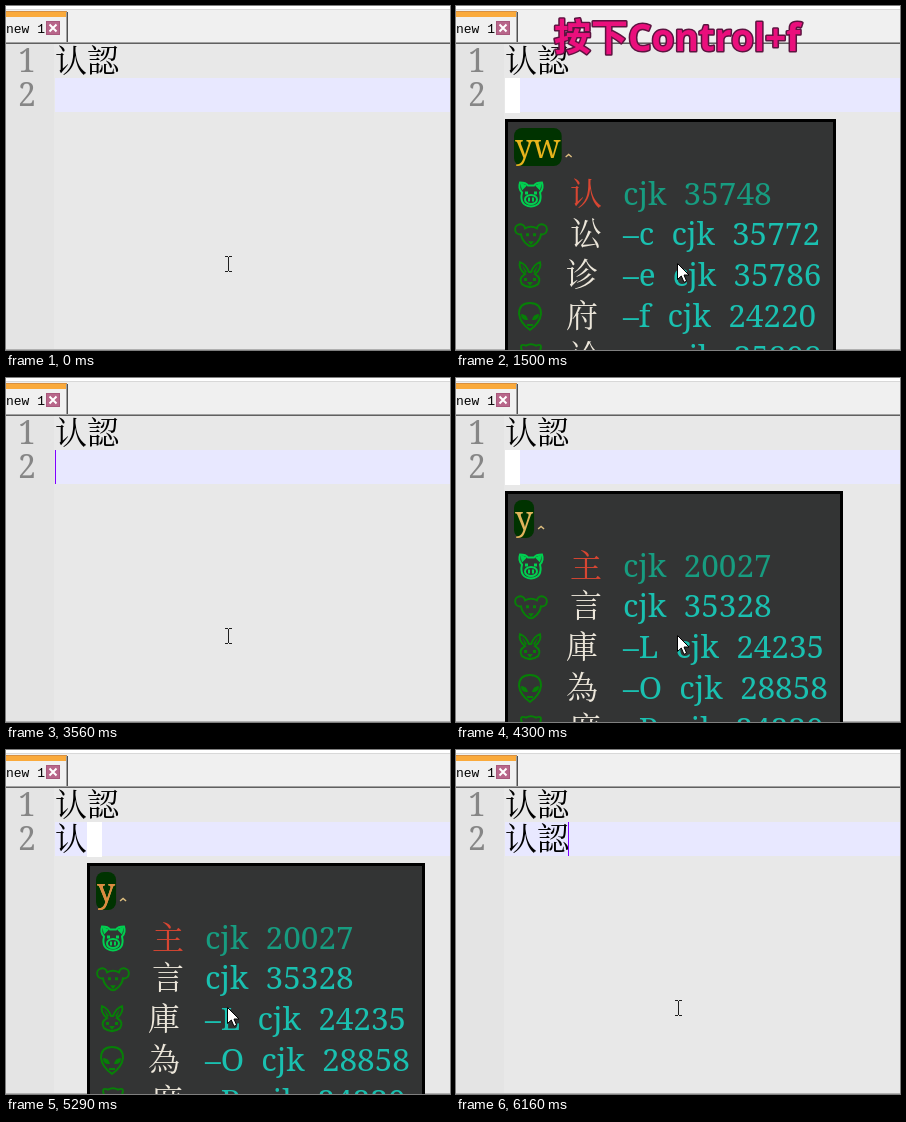
These frames come from a looping animation (444x344 px, 6.66 s). An HTML page with a canvas:

```html
<!DOCTYPE html>
<html lang="zh-CN">
<head>
<meta charset="utf-8">
<style>
html, body { margin: 0; width: 100%; height: 100%; overflow: hidden; }
canvas { display: block; width: 444px; height: 344px; }
</style>
</head>
<body>
<canvas id="stage" width="444" height="344"></canvas>
<script>
const ctx = document.getElementById('stage').getContext('2d');
const LOOP = 6660;
const LATIN = '32px "Noto Serif", serif';
const HAN = '300 32px "Noto Serif CJK SC", "Source Han Serif SC", "Noto Sans CJK SC", "Noto Sans CJK", serif';
const isHan = text => /[\u4e00-\u9fff]/.test(text);

// Candidate lists: code typed, right edge of the popup, rows of "character note"
const LISTS = {
  codes: { code: 'yw', right: 380, rows: ['认 cjk 35748', '讼 –c cjk 35772', '诊 –e cjk 35786', '府 –f cjk 24220', '诠 –g cjk 35808'] },
  pairs: { code: 'yw', right: 378, rows: ['认 認', '讼 訟', '诊 診', '府 –f cjk 24220', '诠 詮'] },
  first: { code: 'y', right: 387, rows: ['主 cjk 20027', '言 cjk 35328', '庫 –L cjk 24235', '為 –O cjk 28858', '度 –P cjk 24230'] }
};

// Each step lasts until the next one begins
const STEPS = [
  { at: 0, text: '' },
  { at: 380, text: '', composing: true },
  { at: 500, text: '', list: 'codes' },
  { at: 1000, text: '', list: 'codes', caret: true },
  { at: 1500, text: '', list: 'codes', hint: true },
  { at: 2170, text: '', list: 'pairs' },
  { at: 2540, text: '', list: 'pairs', caret: true },
  { at: 3040, text: '', list: 'pairs' },
  { at: 3560, text: '', caret: true },
  { at: 4180, text: '', composing: true },
  { at: 4300, text: '', list: 'first' },
  { at: 4420, text: '', list: 'pairs' },
  { at: 4800, text: '', caret: true },
  { at: 4930, text: '认', caret: true },
  { at: 5290, text: '认', list: 'first' },
  { at: 5420, text: '认', list: 'pairs' },
  { at: 5780, text: '认', list: 'pairs', caret: true },
  { at: 6160, text: '认認', caret: true }
];

// Line icons in a 28 px square: outline, then filled details
const ICONS = [
  ['M3 3Q1 9 5 13Q2 26 14 27Q26 26 23 13Q27 9 25 3Q19 3 17 6H11Q9 3 3 3ZM8 20a6 4.5 0 1 0 12 0a6 4.5 0 1 0-12 0',
   'M3 3L10 6L5 11ZM25 3L18 6L23 11ZM8 12h3v3h-3zM17 12h3v3h-3zM11 18h2v4h-2zM15 18h2v4h-2z'],
  ['M8 8A5 5 0 1 0 4 14Q5 20 10 24Q14 28 18 24Q23 20 24 14A5 5 0 1 0 20 8Q14 5 8 8Z',
   'M9 13h3v3h-3zM16 13h3v3h-3zM11 21h6l-3 4z'],
  ['M8 13Q1 7 3 1Q9 3 12 11H14Q17 3 23 1Q25 7 18 13Q25 17 21 23Q13 29 5 23Q1 17 8 13Z',
   'M5 4L10 11L8 12ZM21 4L16 11L18 12ZM7 17h3v3h-3zM16 17h3v3h-3zM10 21h6l-3 4z'],
  ['M2 12Q2 1 13 1Q24 1 24 12Q23 21 13 28Q3 21 2 12ZM10 23h6',
   'M4 12Q10 12 11 18Q4 19 4 12ZM22 12Q16 12 15 18Q22 19 22 12Z'],
  ['M5 8Q2 0 9 3Q14 0 19 3Q26 0 23 8Q26 24 14 27Q2 24 5 8Z',
   'M9 11h3v3h-3zM16 11h3v3h-3z']
].map(paths => paths.map(d => new Path2D(d)));
const NAME_X = [114, 114, 110, 110, 113];

const ARROW = new Path2D('M.5 .5V16.5L4.3 13L7 19.3L9.6 18.2L7 12H12Z');
const IBEAM = new Path2D('M0 .5H3M4 .5H7M3.5 1V15M0 15.5H3M4 15.5H7');

function rect(x, y, w, h, color) {
  ctx.fillStyle = color;
  ctx.fillRect(x, y, w, h);
}

function write(text, x, y, color, font = isHan(text) ? HAN : LATIN) {
  ctx.font = font;
  ctx.fillStyle = color;
  ctx.fillText(text, x, y);
}

function stroke(path, color, width) {
  ctx.strokeStyle = color;
  ctx.lineWidth = width;
  ctx.stroke(path);
}

function at(x, y, draw) {
  ctx.save();
  ctx.translate(x, y);
  draw();
  ctx.restore();
}

function drawEditor(text) {
  rect(0, 0, 444, 344, '#f0f0f0');
  rect(0, 0, 444, 3, '#fff');
  rect(0, 3, 444, 1, '#d8d8d8');

  rect(0, 5, 61, 1, '#d89040');
  rect(0, 6, 61, 5, '#faaa3c');
  rect(60, 6, 1, 30, '#a0a0a0');
  rect(61, 6, 1, 30, '#505050');
  write('new 1', 0, 27, '#000', '13px "Liberation Mono", monospace');
  rect(40, 15, 14, 14, '#a8587c');
  rect(41, 16, 12, 12, '#b8668a');
  stroke(new Path2D('M43.5 18.5L50.5 25.5M50.5 18.5L43.5 25.5'), '#fff', 2);

  rect(0, 36, 444, 1, '#a0a0a0');
  rect(0, 37, 444, 1, '#606060');
  rect(0, 38, 444, 305, '#e8e8e8');
  rect(0, 38, 48, 305, '#e4e4e4');
  rect(49, 72, 395, 34, '#e8e8ff');
  rect(0, 343, 444, 1, '#b0b0b0');

  write('1', 12, 66, '#868686');
  write('2', 12, 100, '#868686');
  write('认認', 49, 66, '#000');
  write(text, 49, 100, '#000');
}

function drawPopup(list, shift) {
  const { code, right, rows } = list;
  at(shift, 0, () => {
    rect(49, 113, right - 49, 231, '#000');
    rect(52, 116, right - 55, 228, '#333434');

    ctx.font = LATIN;
    const codeWidth = ctx.measureText(code).width;
    ctx.fillStyle = '#003300';
    ctx.beginPath();
    ctx.roundRect(58, 122, codeWidth + 2, 38, 8);
    ctx.fill();
    write(code, 59, 152, code === 'y' ? '#e2b45c' : '#e8b41c');
    if (shift) write('y', 59, 152, '#dc8a40');
    at(58 + codeWidth, 0, () => stroke(new Path2D('M6 151L9 148.5L12 151'), '#e0c080', 1.4));

    rows.forEach((row, i) => {
      const y = 198.5 + i * 40.8;
      const split = row.indexOf(' ');
      const note = row.slice(split + 1);
      const [outline, details] = ICONS[i];
      const green = i ? '#078007' : '#00d050';
      at(61, y - 25, () => {
        stroke(outline, green, 2);
        ctx.fillStyle = green;
        ctx.fill(details);
      });
      write(row.slice(0, split), NAME_X[i], y, i ? '#ece6da' : '#d84632');
      ctx.wordSpacing = '9px';
      write(note, isHan(note) ? 152 : 167, y, i ? '#1ac0b0' : '#179c80',
        isHan(note) ? HAN : LATIN.replace('32px', '31.5px'));
      ctx.wordSpacing = '0px';
    });
  });
}

function drawHint() {
  const font = 'bold 37px "Noto Sans", "Noto Sans CJK SC", "Noto Sans CJK", sans-serif';
  ctx.font = font;
  ctx.lineJoin = 'round';
  ctx.strokeStyle = '#5c1440';
  ctx.lineWidth = 3;
  ctx.strokeText('按下Control+f', 98, 45);
  write('按下Control+f', 98, 45, '#ea0f7c', font);
  ctx.lineJoin = 'miter';
}

function draw(time) {
  const step = STEPS.findLast(s => s.at <= time);
  const shift = step.text.length * 32;
  drawEditor(step.text);
  if (step.list || step.composing) rect(49 + shift, 72, 15, 35, '#fff');
  if (step.caret) {
    if (step.list) rect(49 + shift, 72, 2, 35, '#000');
    else rect(shift ? 48 + shift : 49, 72, 1, 34, '#8000ff');
  }
  if (step.list) {
    drawPopup(LISTS[step.list], shift);
    at(221, 257, () => {
      ctx.fillStyle = '#fff';
      ctx.fill(ARROW);
      stroke(ARROW, '#000', 1);
    });
  } else {
    at(219, 250, () => stroke(IBEAM, '#202020', 1));
  }
  if (step.hint) drawHint();
}

const start = performance.now();
function frame() {
  draw((performance.now() - start) % LOOP);
  requestAnimationFrame(frame);
}
frame();
</script>
</body>
</html>
```
